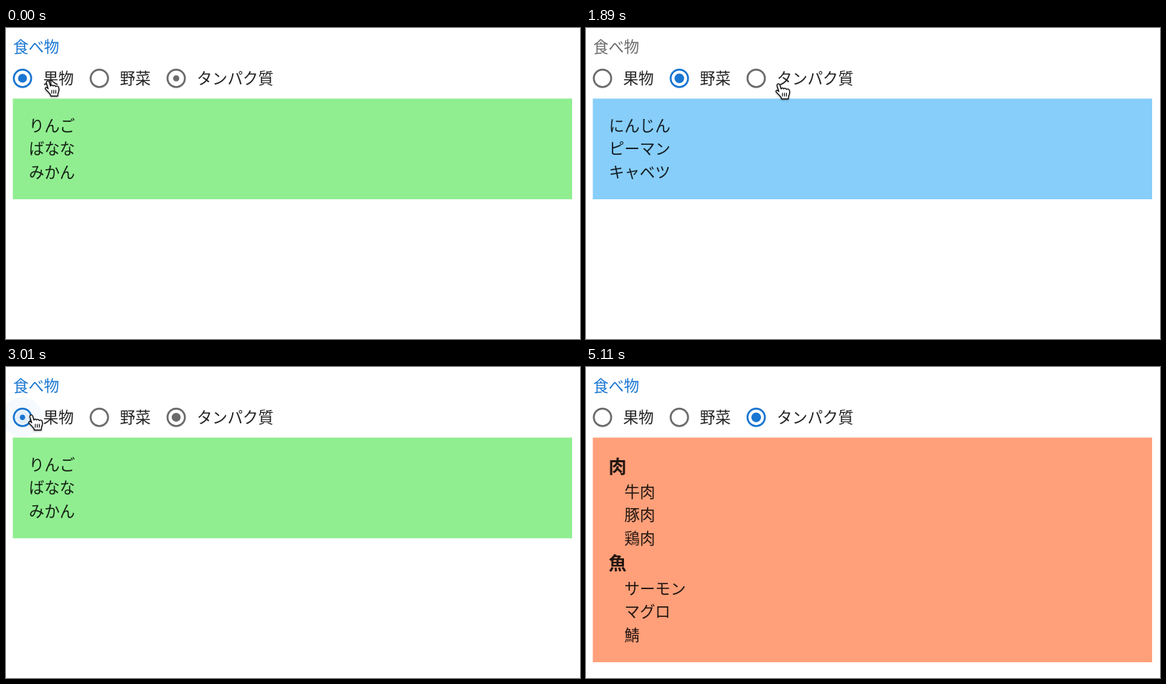
An HTML page for the animation above (5.81 s loop, 800 px wide and 434 px high).

```html
<!DOCTYPE html>
<html lang="ja">
<head>
<meta charset="utf-8">
<style>
  html, body { margin: 0; width: 100%; height: 100%; overflow: hidden; background: #fff; }
  svg { display: block; width: 100%; height: 100%; }
  text { font: 350 21.4px "Noto Sans CJK JP", "Noto Sans CJK", sans-serif; fill: rgba(0, 0, 0, .87); }
  .heading { font-weight: 700; font-size: 25px; }
</style>
</head>
<body>
<svg viewBox="0 0 800 434" id="stage"></svg>
<script>
const LOOP = 5810, STEP = 70;
const BLUE = '#1976d2', GRAY = '#6b6b6b';
const stage = document.getElementById('stage');

function add(tag, attrs, parent = stage, content = '') {
  const el = document.createElementNS('http://www.w3.org/2000/svg', tag);
  for (const key in attrs) el.setAttribute(key, attrs[key]);
  el.textContent = content;
  return parent.appendChild(el);
}

// Text placed by its vertical middle.
const label = (content, x, middle, parent, heading) =>
  add('text', { x, y: middle + (heading ? 9.3 : 8), class: heading ? 'heading' : '' }, parent, content);

const title = label('食べ物', 10, 26);

const radios = ['果物', '野菜', 'タンパク質'].map((name, i) => {
  const cx = 23 + i * 107.1, cy = 70.2;
  label(name, cx + 28.7, 70);
  return {
    ring: add('circle', { cx, cy, r: 12.1, fill: 'none', 'stroke-width': 2.7 }),
    dot: add('circle', { cx, cy, r: 0 })
  };
});

function panel(color, height, rows) {
  const group = add('g', {});
  add('rect', { x: 9.5, y: 98.5, width: 779.5, height, fill: color }, group);
  rows.forEach(([content, x, y, heading]) => label(content, x, y, group, heading));
  return group;
}
const list = (names, x, y) => names.map((name, i) => [name, x, y + i * 32.4]);

const panels = [
  panel('#90ee90', 140.5, list(['りんご', 'ばなな', 'みかん'], 32, 136)),
  panel('#87cefa', 140.5, list(['にんじん', 'ピーマン', 'キャベツ'], 32, 136)),
  panel('#ffa07a', 313.5, [
    ['肉', 31.5, 139, true], ...list(['牛肉', '豚肉', '鶏肉'], 53.5, 174),
    ['魚', 31.5, 273.5, true], ...list(['サーモン', 'マグロ', '鯖'], 53.5, 309)
  ])
];

const hover = add('circle', { cx: 23, cy: 70.2, r: 28, fill: BLUE });
const ripple = add('circle', { cx: 23, cy: 70.2, fill: BLUE });

const hand = add('g', { style: 'filter: drop-shadow(0 1px 1px rgba(0,0,0,.35))' });
add('path', {
  d: 'M4.8 11.8L2.4 4C1.6 .7 5.2 -.2 6.2 2.6L8 8C8.6 6.4 11 6.4 11.6 8C12.4 6.7 14.8 6.9 15.2 8.7' +
     'C16.4 7.6 19 8 19.4 10C20.6 14 19.2 16 18.5 18L18 22H8.5L8 20C6 17.5 4 15.2 1.7 13C-.3 11 1.6 9 3.4 10.5Z',
  fill: '#fff', stroke: '#111', 'stroke-width': 1.4, 'stroke-linejoin': 'round'
}, hand);
add('path', { d: 'M9.8 13.5V18.5M12.6 13.5V18.5M15.4 13.5V18.5', stroke: '#111', 'stroke-width': 1.2 }, hand);

// press: title loses focus; at: selection switches
const clicks = [
  { press: -200, at: -85, from: 2, to: 0 },
  { press: 1050, at: 1145, from: 0, to: 1 },
  { press: 1890, at: 1988, from: 1, to: 2 },
  { press: 2940, at: 2975, from: 2, to: 0 },
  { press: 3640, at: 3763, from: 0, to: 1 },
  { press: 4620, at: 4765, from: 1, to: 2 }
];

// [time, x, y]
const path = [
  [0, 54, 73], [210, 54, 73], [560, 148, 84], [770, 148, 84], [980, 152, 83],
  [1400, 152, 83], [1750, 264, 77], [2380, 264, 77], [2590, 31, 66],
  [3220, 31, 66], [3570, 156, 68], [3920, 156, 68], [4270, 284, 61], [LOOP, 284, 61]
];

const clamp = v => Math.max(0, Math.min(1, v));
const smooth = p => p * p * (3 - 2 * p);

function cursorAt(t) {
  const i = path.findIndex(p => p[0] > t);
  const [t0, x0, y0] = path[i - 1], [t1, x1, y1] = path[i];
  const k = smooth((t - t0) / (t1 - t0));
  return [x0 + (x1 - x0) * k, y0 + (y1 - y0) * k];
}

function draw(t) {
  const { at, from, to } = clicks.filter(c => c.at <= t).pop();
  const p = clamp((t - at) / 150);
  radios.forEach(({ ring, dot }, i) => {
    const color = i === to ? BLUE : GRAY;
    const scale = i === to ? 1 - (1 - p) ** 3 : i === from ? 1 - p ** 1.8 : 0;
    ring.setAttribute('stroke', color);
    dot.setAttribute('fill', color);
    dot.setAttribute('r', 6.7 * scale);
    panels[i].style.display = i === to ? '' : 'none';
  });
  title.style.fill = clicks.some(c => t >= c.press && t < c.at) ? GRAY : BLUE;

  const [x, y] = cursorAt(t);
  hand.setAttribute('transform', `translate(${x} ${y})`);
  hand.style.display = t < 5110 ? '' : 'none';
  hover.setAttribute('opacity', Math.hypot(x + 5 - 23, y + 1 - 70) < 28 ? .04 : 0);

  const age = (t - 2940) / 560;
  ripple.setAttribute('r', 28 * (1 - (1 - clamp(age)) ** 3));
  ripple.setAttribute('opacity', age < 0 ? 0 : .1 * (1 - clamp(age)));
}

const start = performance.now();
function tick() {
  const t = (performance.now() - start) % LOOP;
  draw(Math.floor(t / STEP) * STEP);
  requestAnimationFrame(tick);
}
tick();
</script>
</body>
</html>
```
